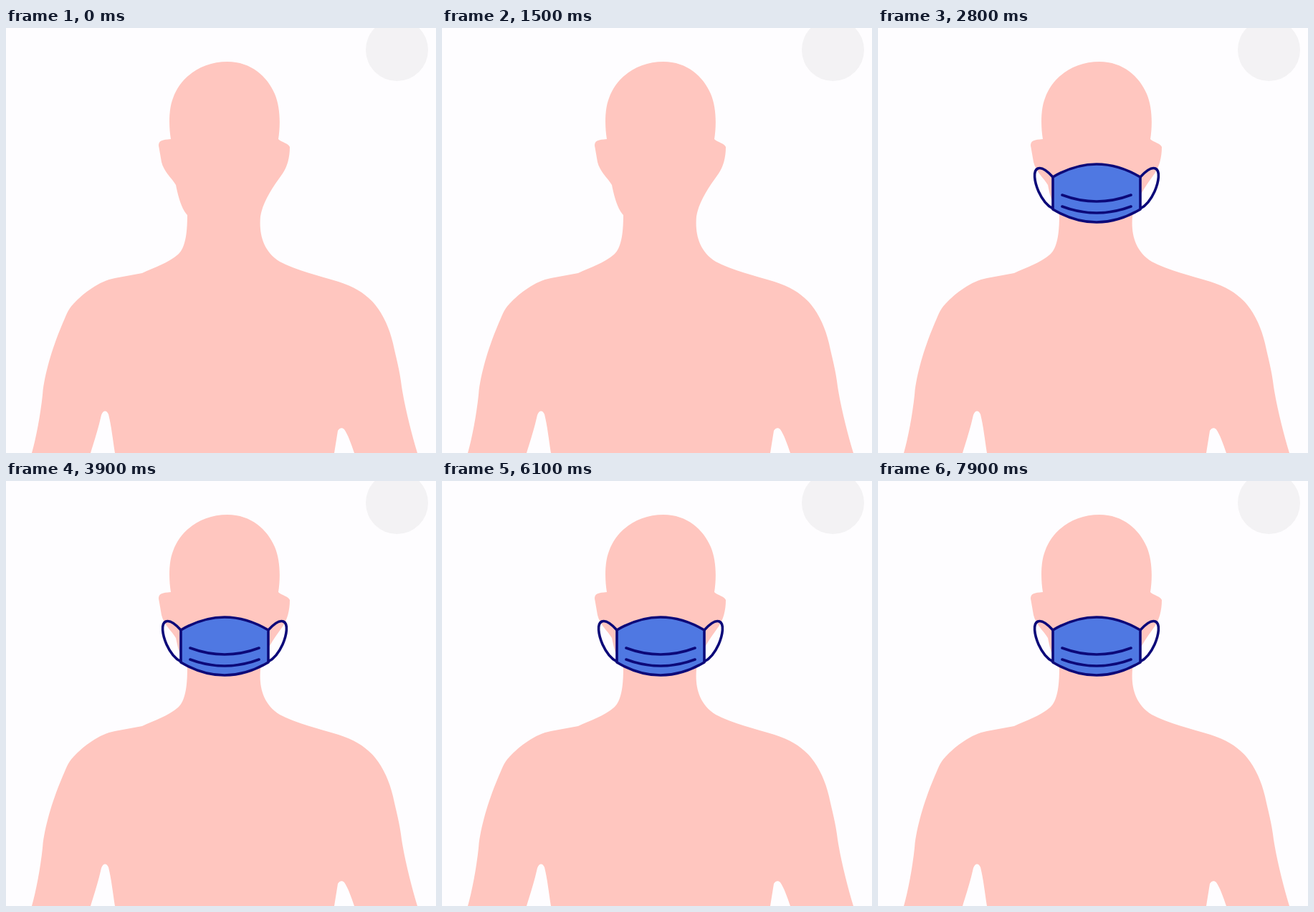
These frames come from a looping animation (600x593 px, 8000 ms). An HTML page:

```html
<!DOCTYPE html>
<html lang="en">
<head>
<meta charset="utf-8">
<title>Putting on a mask</title>
<style>
  html, body { margin: 0; width: 100%; height: 100%; overflow: hidden; background: #fefdff; }
  svg { display: block; width: 100%; height: 100%; }
</style>
</head>
<body>
<svg viewBox="0 0 600 593">
  <circle cx="545.5" cy="30.5" r="43.5" fill="#f3f2f4"/>
  <path fill="#ffc6bf" d="M36 593 C42 572 48 540 51 512 C53 486 64 448 77 417
    C84 401 86 393 94 385 C108 370 130 353 152 349 L190 342 C207 334 226 328 240 316
    C250 307 253 288 253 261 C245 253 240 234 237 219 C231 209 220 200 217 187
    L213 164 C213 157 218 156 230 155 C227 137 227 113 233 98
    C244 67 274 47 309 47 C342 47 365 68 375 92 C383 111 383 136 380 155
    C385 160 393 160 396 166 C396 182 392 194 386 203 C370 225 358 244 355 263
    C353 286 358 311 382 326 C404 338 438 346 464 354 C489 362 503 372 515 386
    C527 401 535 419 540 440 C545 463 549 476 552 500 C557 532 566 566 574 593
    L486 593 C482 581 477 567 472 560 C469 557 465 558 463 562 L458 593
    L152 593 C149 574 147 555 143 539 C140 533 136 533 133 540 C129 558 123 577 118 593 Z"/>
  <g id="mask" fill="none" stroke="#0c0979" stroke-width="3.6" stroke-linecap="round" stroke-linejoin="round">
    <path d="M244 208 C235 198 228 194 223 196 C216 199 218 214 224 228 C229 239 236 248 244 252"/>
    <path d="M366 208 C375 198 382 194 387 196 C394 199 392 214 386 228 C381 239 374 248 366 252"/>
    <path fill="#4f78e2" d="M244 208 Q305 172 366 208 V253 Q305 289 244 253 Z"/>
    <path d="M257 233 Q305 251 353 233 M257 249 Q305 267 353 249"/>
  </g>
</svg>
<script>
  const LOOP = 8000, FADE_START = 1500, FADE_END = 2200;
  const mask = document.getElementById('mask');

  function draw(now) {
    const t = now % LOOP;
    const p = (t - FADE_START) / (FADE_END - FADE_START);
    mask.setAttribute('opacity', Math.min(1, Math.max(0, p)));
    requestAnimationFrame(draw);
  }
  draw(performance.now());
</script>
</body>
</html>
```
